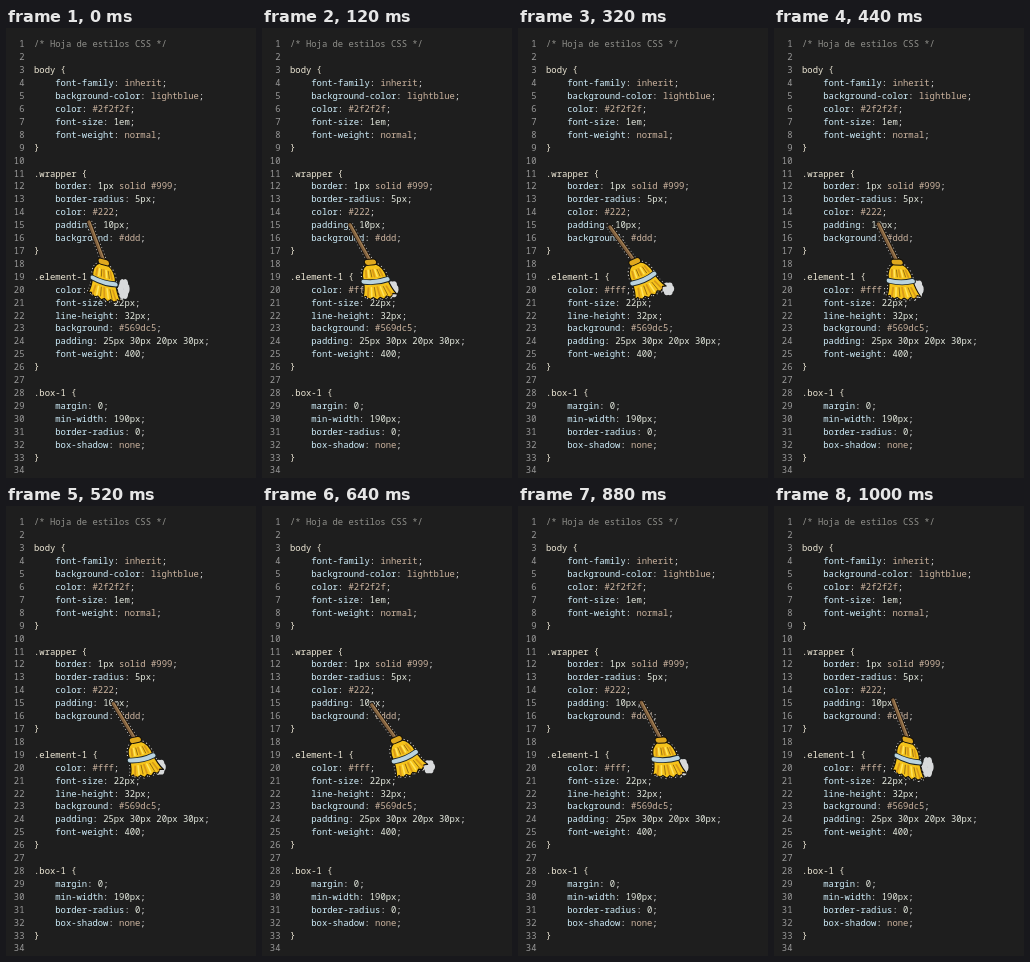
Write an HTML page that moves like this. It is 250 px wide and 450 px high and loops after 1.08 s.

```html
<!DOCTYPE html>
<html lang="es">
<head>
<meta charset="utf-8">
<title>Hoja de estilos</title>
<style>
  html, body { margin: 0; width: 100%; height: 100%; overflow: hidden; background: #1e1e1e; }
  svg { display: block; width: 250px; height: 450px; }
  text { font: 500 8.87px "Noto Sans Mono", "DejaVu Sans Mono", monospace; white-space: pre; }
</style>
</head>
<body>
<svg viewBox="0 0 250 450">
  <rect width="250" height="450" fill="#1e1e1e"/>
  <g id="code"></g>
  <g id="dust" fill="#d8dadb"></g>
  <g id="stick"></g>
  <g id="head" fill="none" stroke-linejoin="round" stroke-linecap="round"></g>
</svg>
<script>
const $ = id => document.getElementById(id);
const range = n => Array.from({ length: n }, (_, i) => i);
const mix = (a, b, k) => a + (b - a) * k;
const radians = degrees => degrees * Math.PI / 180;

const colors = {
  comment: '#91918c', number: '#e6ebe0', value: '#cdb5a0',
  property: '#d0effc', selector: '#f0ead8', mark: '#dedede', gutter: '#9a9a9a'
};

const source = `/* Hoja de estilos CSS */

body {
    font-family: inherit;
    background-color: lightblue;
    color: #2f2f2f;
    font-size: 1em;
    font-weight: normal;
}

.wrapper {
    border: 1px solid #999;
    border-radius: 5px;
    color: #222;
    padding: 10px;
    background: #ddd;
}

.element-1 {
    color: #fff;
    font-size: 22px;
    line-height: 32px;
    background: #569dc5;
    padding: 25px 30px 20px 30px;
    font-weight: 400;
}

.box-1 {
    margin: 0;
    min-width: 190px;
    border-radius: 0;
    box-shadow: none;
}
`;

const span = (kind, s) => `<tspan fill="${colors[kind]}">${s}</tspan>`;

function paint(line) {
  if (line.startsWith('/*')) return span('comment', line);
  const colon = line.indexOf(':');
  if (colon < 0) return span('selector', line);
  const values = line.slice(colon + 1).match(/#?\w+|[^#\w]+/g).map(token =>
    span(/^\d/.test(token) ? 'number' : /\w/.test(token) ? 'value' : 'mark', token));
  return span('property', line.slice(0, colon)) + span('mark', ':') + values.join('');
}

function codeLine(line, i) {
  const y = 19.4 + i * 12.91;
  return `<text x="18.500" y="${y}" text-anchor="end">${span('gutter', i + 1)}</text>` +
    `<text x="28" y="${y}">${paint(line)}</text>`;
}

const stroke = (d, color, width, extra = '') =>
  `<path d="${d}" stroke="${color}" stroke-width="${width}" ${extra}/>`;
const fringe = 'stroke-dasharray="1 2.5" stroke-linecap="butt"';

// The broom hangs down from its neck at 0,0; u runs across it from -1 to 1.
function broomHead() {
  const tips = range(11).map(i => {
    const u = i / 5 - 1;
    return `L${17 * u} ${40 - 4 * u * u - (i % 2) * 2.5}`;
  }).join('');
  const outline = `M-4 3C-10 6-12 12-12 19Q-13 29-17 36${tips}Q13 29 12 19C12 12 10 6 4 3Z`;
  const strands = range(7).map(i => {
    const u = (i - 3) / 4;
    const [color, width] = [['#d99a18', 1.8], ['#ffe35c', 1.6], ['#7a540f', .7]][i % 3];
    return stroke(`M${9 * u} 9L${11 * u} 16M${12 * u} 27L${16 * u} 36`, color, width);
  }).join('');
  return stroke(outline, '#ddd', 3, fringe) +
    stroke(outline, '#17120a', 1.2, 'fill="#f5c31b"') + strands +
    stroke('M-12 20Q0 23 12 20', '#1c2529', 6) +
    stroke('M-12 20Q0 23 12 20', '#b9d3df', 4.2) +
    stroke('M-3 1L3 1', '#17120a', 7) +
    stroke('M-3 1L3 1', '#dfa81e', 5);
}

const puff = range(6).map(i => {
  const a = i * Math.PI / 3;
  return `<circle cx="${.5 * Math.cos(a)}" cy="${.5 * Math.sin(a)}" r=".48"/>`;
}).join('');

$('code').innerHTML = source.split('\n').map(codeLine).join('');
$('dust').innerHTML = puff;
$('head').innerHTML = broomHead();

const SWEEP = 360;
const STRIDE = 18;

// Two full sweeps, then a half sweep that swings back.
function swingAt(sweep, t) {
  return sweep < 2
    ? Math.sin(Math.PI / 2 * Math.min(1, t / 320))
    : .5 * Math.sin(Math.PI * t / 280);
}

function draw(t) {
  const sweep = Math.floor(t / SWEEP);
  const swing = swingAt(sweep, t % SWEEP);
  const x = 82 + STRIDE * sweep + 9 * swing;
  const y = 193 + 5 * swing;
  const tilt = radians(mix(21.5, 36, swing));
  const neckX = x + 43 * Math.sin(tilt);
  const neckY = y + 43 * Math.cos(tilt);
  const slope = radians(mix(16, -24, swing));
  const lean = radians(mix(1, 27, swing));

  const shaft = `M${x + 1} ${y + 1}L${neckX} ${neckY}`;
  $('stick').innerHTML = stroke(shaft, '#ddd', 6.5, fringe) +
    stroke(shaft, '#15100c', 5, 'stroke-linecap="round"') +
    stroke(shaft, '#80603f', 3.4, 'stroke-linecap="round"') +
    stroke(shaft, '#aa8759', 1, 'transform="translate(.7 -.4)"');
  $('head').setAttribute('transform', `matrix(${Math.cos(slope)} ${Math.sin(slope)} ` +
    `${Math.sin(lean)} ${Math.cos(lean)} ${neckX} ${neckY})`);
  $('dust').setAttribute('transform',
    `translate(${neckX + 20 + 14 * swing ** 3} ${neckY + 28}) scale(6 ${11 - 4 * swing})`);
}

// The picture moves every 40 ms and rests at both ends of the loop.
const start = performance.now();
function tick() {
  const t = (performance.now() - start) % 1080;
  draw(t < 80 ? 0 : Math.min(1000, Math.floor(t / 40) * 40));
  requestAnimationFrame(tick);
}
tick();
</script>
</body>
</html>
```
